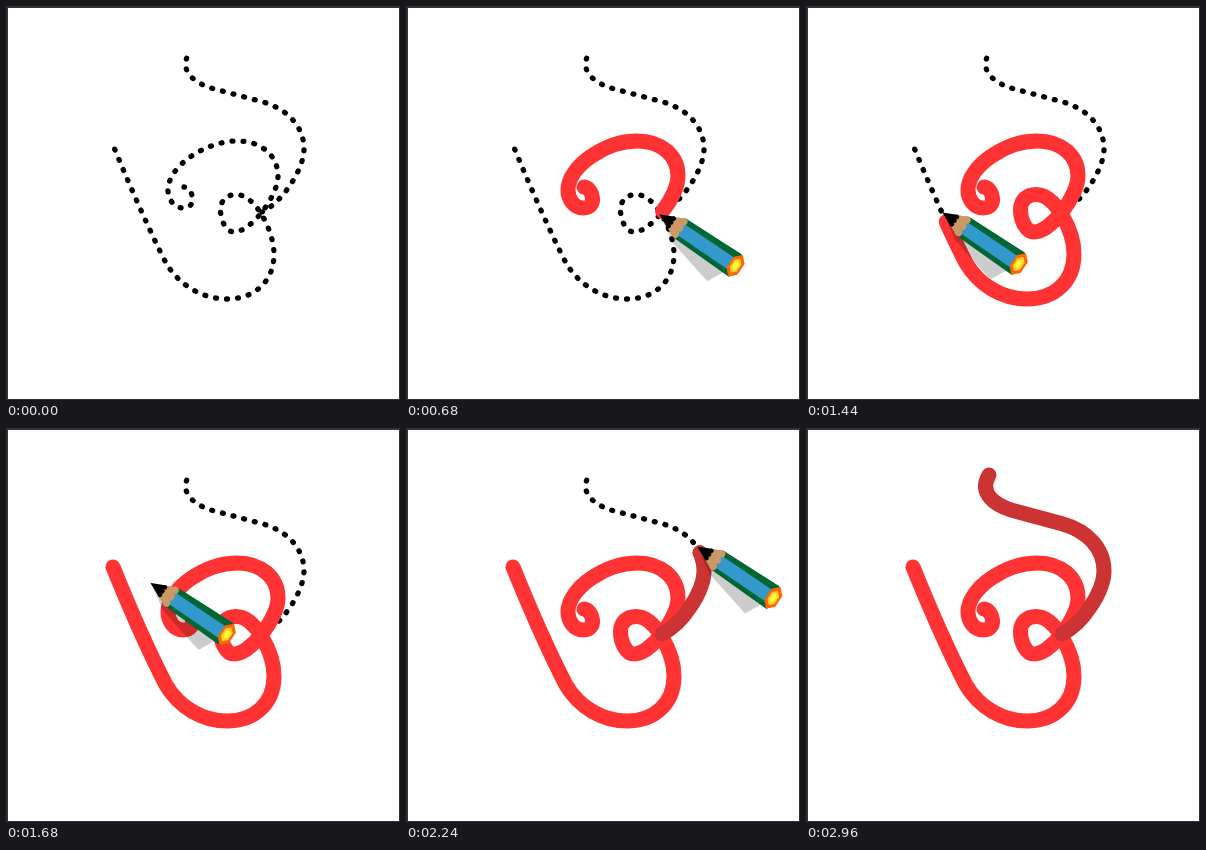
Animation of 394x394 px, one loop 3 s. Source, as an HTML page with a canvas:

```html
<!DOCTYPE html>
<html lang="en">
<head>
<meta charset="utf-8">
<title>Tracing a letter</title>
<style>
html, body { margin: 0; width: 100%; height: 100%; overflow: hidden; background: #fff; }
canvas { display: block; width: 394px; height: 394px; }
svg { position: absolute; }
</style>
</head>
<body>
<canvas id="stage" width="394" height="394"></canvas>
<svg width="0" height="0" fill="none">
  <path id="body" d="M178,181 C187,182 192,202 177,202 C168,202 162,193 162,184
    C162,160 200,135 231,135 C256,135 272,150 272,170 C272,190 245,226 228,226
    C220,226 214.5,214 214.5,204 C214.5,194 221,188.5 230,188.5 C250,188.5 268,226 268,248
    C268,276 248,293 221,293 C196,293 173,279 160,257 C145,228 122,176 107,139"/>
  <path id="tail" d="M256,206 C278,195 298,162 298,143 C298,120 281,103 257,96
    L205,82 C190,77 172,66 183,47"/>
</svg>
<script>
const SIZE = 394, LOOP = 3000, STEP = 40;
const LIFT = 1600, LAND = 1920, TAIL_START = 1960, FADE = 2600, GONE = 2960;
const INK_LAG = 16;
const ctx = document.getElementById('stage').getContext('2d');

// keys: [time in ms, position counted in guide dots]
function makeCurve(id, color, dots, keys) {
  const el = document.getElementById(id), length = el.getTotalLength();
  return {
    el, color, keys, length,
    path: new Path2D(el.getAttribute('d')),
    gap: (length - 6.3) / (dots - 1)
  };
}

const curves = [
  makeCurve('body', '#ff3333', 63, [[0, 0], [360, 12.6], [1120, 37.2], [1440, 55.8], [LIFT, 63]]),
  makeCurve('tail', '#cc3333', 23, [[TAIL_START, 0], [2240, 9.4], [FADE, 23]])
];
const [body, tail] = curves;

const lerp = (a, b, f) => a + (b - a) * f;
const clamp = (v, lo, hi) => Math.min(hi, Math.max(lo, v));

function travelled({ keys, gap, length }, t) {
  let dots = 0;
  for (let i = 1; i < keys.length; i++) {
    const [t0, d0] = keys[i - 1], [t1, d1] = keys[i];
    if (t > t0) dots = lerp(d0, d1, Math.min(1, (t - t0) / (t1 - t0)));
  }
  return Math.min(length, dots * gap);
}

function strokeCurve(curve, color, width, dash, offset = 0) {
  ctx.strokeStyle = color;
  ctx.lineWidth = width;
  ctx.setLineDash(dash);
  ctx.lineDashOffset = offset;
  ctx.stroke(curve.path);
}

function drawInk(curve, t) {
  const len = travelled(curve, t - INK_LAG);
  if (len > 0) strokeCurve(curve, curve.color, 15, [len, 2 * curve.length]);
}

function poly(color, ...pts) {
  ctx.fillStyle = color;
  ctx.beginPath();
  pts.forEach(p => ctx.lineTo(...p));
  ctx.closePath();
  ctx.fill();
}

// Cone from the tip, ending in three scallops
function cone(color, len) {
  const half = len * 0.46, r = half / 3;
  poly(color, [0, 0], [len, -half], [len, half]);
  for (let k = -1; k <= 1; k++) {
    ctx.beginPath();
    ctx.arc(len, 2 * k * r, r, 0, 2 * Math.PI);
    ctx.fill();
  }
}

function hexagon(color, x, ry) {
  const pts = [];
  for (let k = 0; k < 6; k++) {
    const a = Math.PI / 2 + k * Math.PI / 3;
    pts.push([x + ry * 0.58 * Math.cos(a), ry * Math.sin(a)]);
  }
  poly(color, ...pts);
}

function drawPencil(x, y, alpha) {
  ctx.save();
  ctx.globalAlpha = alpha;
  ctx.translate(x, y);
  poly('rgba(0,0,0,.2)', [2, 4], [13, 28], [48, 67], [64, 58]);
  ctx.rotate(34 * Math.PI / 180);
  poly('#006633', [24, -11.3], [91, -13], [93, 13], [25, 11.3]);
  poly('#3399cc', [24, -6], [88, -6], [88, 7.5], [24, 7]);
  cone('#cc9966', 24.5);
  cone('#000', 14.5);
  hexagon('#ff6600', 92, 13);
  hexagon('#ffcc33', 92, 8.5);
  hexagon('#ffff33', 92, 5);
  ctx.restore();
}

function pencilTip(t) {
  if (t > LIFT && t <= TAIL_START) {
    const f = Math.min(1, (t - LIFT) / (LAND - LIFT));
    return [lerp(107, 257, f), lerp(138, 206, f)];
  }
  const curve = t <= LIFT ? body : tail;
  const p = curve.el.getPointAtLength(travelled(curve, t));
  return [p.x, p.y - 1];
}

function draw(t) {
  ctx.fillStyle = '#333';
  ctx.fillRect(0, 0, SIZE, SIZE);
  ctx.fillStyle = '#fff';
  ctx.fillRect(2, 2, SIZE - 3, SIZE - 3);
  ctx.lineCap = ctx.lineJoin = 'round';
  curves.forEach(c => strokeCurve(c, '#000', 5.3, [0.9, c.gap - 0.9], 0.45));
  curves.forEach(c => drawInk(c, t));
  if (t > 0) drawPencil(...pencilTip(t), clamp((GONE - t) / (GONE - FADE), 0, 1));
}

const start = performance.now();
function tick() {
  const t = (performance.now() - start) % LOOP;
  draw(Math.floor(t / STEP) * STEP);
  requestAnimationFrame(tick);
}
tick();
</script>
</body>
</html>
```
